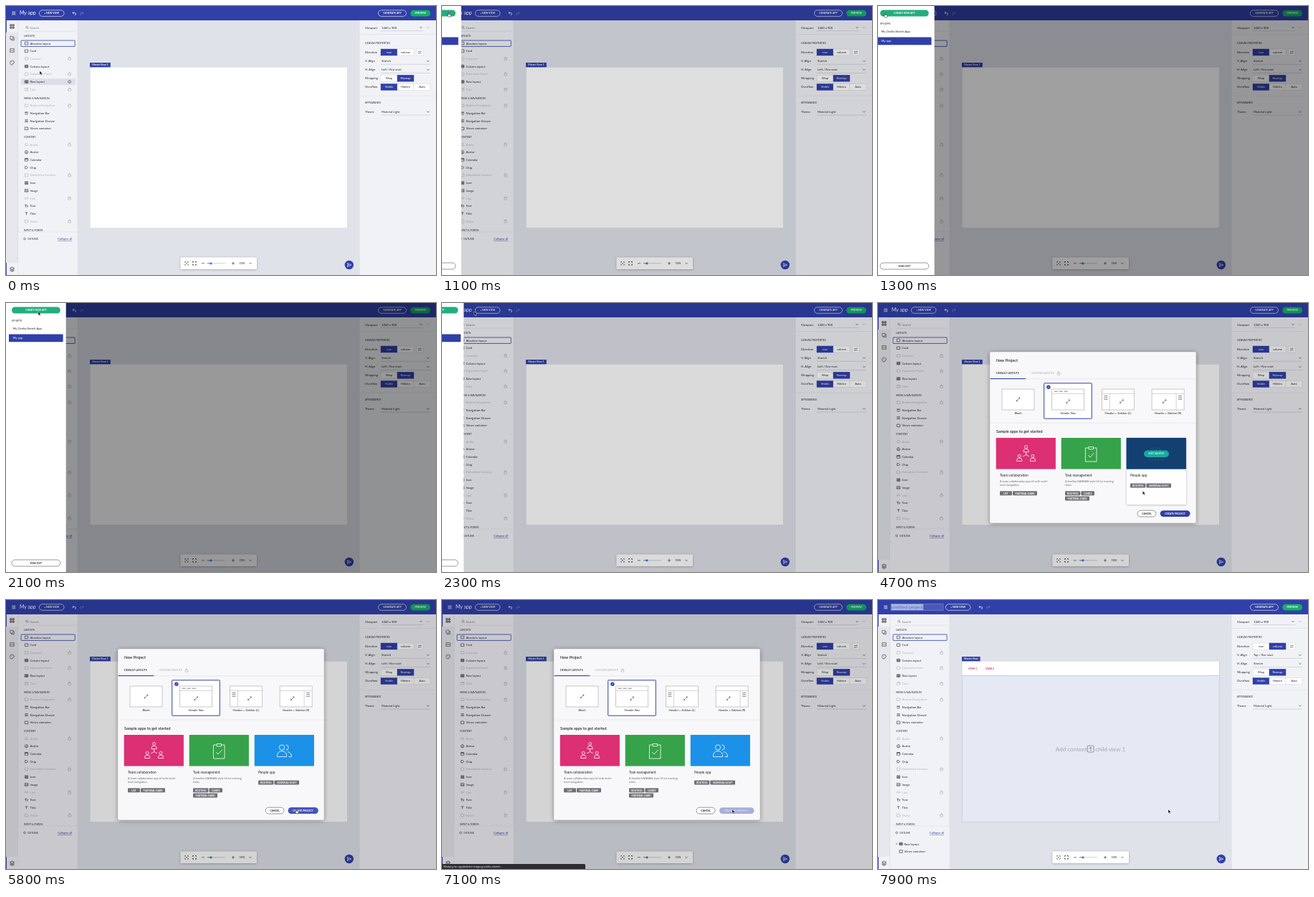
An HTML page that plays this animation: 600x375 px, repeating every 8000 ms.

```html
<!DOCTYPE html>
<html lang="en">
<head>
<meta charset="utf-8">
<title>App builder</title>
<style>
html, body { margin: 0; width: 100%; height: 100%; overflow: hidden; background: #e0e2ea; }
svg { display: block; width: 100vw; height: 100vh; font-family: Lato, "Open Sans", sans-serif; font-weight: 400; }
</style>
</head>
<body>
<svg id="stage" viewBox="0 0 600 375"></svg>
<script>
const LOOP = 8000, STEP = 100;
const INDIGO = '#3040a8', INK = '#25262c', GREY = '#b2b4bb', PANEL = '#f1f2f6', RULE = '#dcdee5';

// Drawing helpers
const attrs = o => Object.entries(o).map(([k, v]) => ` ${k}="${v}"`).join('');
const rect = (x, y, w, h, fill, o = {}) =>
  `<rect x="${x}" y="${y}" width="${w}" height="${h}" fill="${fill}"${attrs(o)}/>`;
const circle = (cx, cy, r, fill, o = {}) => `<circle cx="${cx}" cy="${cy}" r="${r}" fill="${fill}"${attrs(o)}/>`;
const line = (d, stroke = INK, w = 0.6, o = {}) =>
  `<path d="${d}" fill="none" stroke="${stroke}" stroke-width="${w}"${attrs(o)}/>`;
const text = (x, y, s, size = 4.2, fill = INK, o = {}) =>
  `<text x="${x}" y="${y}" font-size="${size}" fill="${fill}"${attrs(o)}>${s}</text>`;
const mid = (x, y, s, size, fill, o = {}) => text(x, y, s, size, fill, { 'text-anchor': 'middle', ...o });
const group = (id, body, o = {}) => `<g id="${id}"${attrs(o)}>${body}</g>`;
const at = (x, y, body) => `<g transform="translate(${x} ${y})">${body}</g>`;
const bold = { 'font-weight': 700 }, semi = { 'font-weight': 600 };

const pill = (x, y, w, h, label, fill, color, stroke = 'none') =>
  rect(x, y, w, h, fill, { rx: h / 2, stroke, 'stroke-width': 0.6 }) +
  mid(x + w / 2, y + h / 2 + 1.25, label, 3.5, color, bold);
const caret = (x, y) => line(`M${x - 1.6} ${y - 0.8}l1.6 1.6 1.6-1.6`, INK, 0.6);
const lock = (x, y) => at(x, y,
  rect(-1.8, -0.8, 3.6, 2.9, 'none', { rx: 0.4, stroke: '#9a9ca4', 'stroke-width': 0.5 }) +
  line('M-1-.8v-.6a1 1 0 0 1 2 0v.6', '#9a9ca4', 0.5));
const heading = (x, y, s) => text(x, y, s, 3.45, '#4a4b52', semi);

// Component palette; * marks a locked entry
const sections = [
  ['LAYOUTS', 52, 'Absolute layout,Card,*Carousel,Column layout,*Expansion Panel,Row layout,*Tabs'],
  ['MENU &amp; NAVIGATION', 138.7, '*Bottom Navigation,Navigation Bar,Navigation Drawer,Views container'],
  ['CONTENT', 193, '*Audio,Avatar,Calendar,Chip,*Embedded Content,Icon,Image,*Link,Text,Title,*Video']
];
const box = 'M-2.2-1.8h4.4v3.6h-4.4z';
const glyphs = {
  'Column layout': box + 'M-.8-1.8v3.6M.8-1.8v3.6M-2.2 0h4.4',
  'Row layout': box + 'M-2.2-.6h4.4M-2.2.6h4.4M0-1.8v3.6',
  Tabs: box + 'M0-1.8v1.2h2.2',
  'Navigation Bar': 'M-2.2-1.4h4.4M-2.2-.8h4.4M-2.2 1.4h4.4',
  'Navigation Drawer': 'M-2.2-1.5h4.4M-2.2 0h4.4M-2.2 1.5h4.4',
  Audio: 'M-1.6 1.6v-1.6a1.6 1.6 0 0 1 3.2 0v1.6z',
  Avatar: 'M-2.1 0a2.1 2.1 0 1 0 4.2 0a2.1 2.1 0 1 0-4.2 0M-1.2 1.4q1.2-1.4 2.4 0M-.5-.5h1',
  Calendar: box + 'M-2.2-1h4.4M-1-2.4v1M1-2.4v1',
  Chip: 'M-1.8-1.6h2l1.8 1.6-1.8 1.6h-2z',
  Icon: 'M-2-1.8h1.7v1.5h-1.7zM.4-1.8h1.7v1.5h-1.7zM-2 .4h1.7v1.5h-1.7zM.4 .4h1.7v1.5h-1.7z',
  Image: box + 'M-2 1.4l1.4-1.6 1 1 .8-.8 1 1.4',
  Link: 'M-.4 1h-.8a1 1 0 0 1 0-2h.8M.4-1h.8a1 1 0 0 1 0 2h-.8M-.8 0h1.6',
  Text: 'M-2.4-1.6h2.8M-1-1.6v3.4M.4-.3h2M1.4-.3v2.1',
  Title: 'M-1.8-1.6h3.6M0-1.6v3.4'
};
const items = [];
let palette = '';
for (const [title, top, names] of sections) {
  palette += heading(25, top - 8.6, title);
  names.split(',').forEach((raw, i) => {
    const locked = raw[0] === '*', name = raw.replace('*', ''), y = top + 10.72 * i;
    const color = locked ? GREY : INK;
    if (!locked) items.push(y);
    palette += at(28.5, y, line(glyphs[name] || box, color, 0.6)) + text(33.5, y + 1.5, name, 4.2, color);
    if (locked) palette += lock(88.6, y);
  });
}

const segment = (x, y, labels, on) => labels.map((s, i) =>
  rect(x + i * 23, y, 23, 9, i === on ? INDIGO : '#fff', { stroke: i === on ? INDIGO : '#c9cbd4', 'stroke-width': 0.4 }) +
  mid(x + i * 23 + 11.5, y + 5.9, s, 4, i === on ? '#fff' : INK)).join('');
const select = (y, value, right = 592) =>
  text(524, y + 1.5, value) + caret(right - 3, y) + line(`M523 ${y + 4.6}H${right}`, '#a9abb3', 0.4);

const expand = 'M-2.3-1v-1.3h1.3M1-2.3h1.3v1.3M2.3 1v1.3h-1.3M-1 2.3h-1.3v-1.3';
const plane = 'M-2.6-2.5l5.6 2.5-5.6 2.5.7-2.5zM-1.9 0h2.2';

const shell =
  rect(0, 0, 600, 375, '#e0e2ea') +
  rect(0, 20, 17, 355, '#e6e7ec') + rect(0, 20, 17, 17, PANEL) + rect(0, 358, 17, 17, PANEL) +
  rect(0, 20, 0.9, 17, INDIGO) + rect(0, 358, 0.9, 17, INDIGO) +
  rect(17, 20, 83, 355, PANEL) + line('M16.8 20V375M100 20V375', '#d3d5dd', 0.5) +
  rect(493, 20, 107, 355, PANEL) + line('M493 20V375', '#d3d5dd', 0.5) +
  line('M493 39.5H600M493 125.3H600', RULE, 0.6) +
  at(8.5, 28.5, line('M-2.7-2.7h2v2h-2zM.7-2.7h2v2h-2zM-2.7 .7h2v2h-2zM.7 .7h2v2h-2z', INK, 0.8)) +
  at(8.5, 45, line('M-2.7-2.7h4v4h-4zM-1 1.3v1.4h3.8v-4h-1.4', '#555', 0.7)) +
  at(8.5, 62, line('M-2.8-2.5h5.6v5h-5.6zM-2.8 0h5.6', '#555', 0.7)) +
  at(8.5, 79, line('M.5 3A3 3 0 1 1 3 0q0 1.2-1.5 1.2T.5 3zM-1.4-.6h.5M0-1.5h.5M1.3-.5h.4', '#555', 0.7)) +
  at(8.5, 367, line('M0-3l3 1.6-3 1.6-3-1.6zM-3 .3l3 1.6 3-1.6M-3 1.7l3 1.6 3-1.6', INK, 0.7)) +
  circle(29.2, 29.6, 1.4, 'none', { stroke: '#555', 'stroke-width': 0.5 }) + line('M30.3 30.7l1.3 1.3', '#555', 0.5) +
  text(33.5, 31.5, 'Search', 4.2, '#777') + line('M24 35.2H97', '#c6c8d0', 0.4) +
  group('hover', rect(21, -4.3, 76, 8.6, '#dcdee6') +
    circle(88.6, 0, 1.9, 'none', { stroke: INK, 'stroke-width': 0.5 }) + line('M88.6-.3v1.3M88.6-1v.3', INK, 0.5)) +
  rect(21, 48, 75.2, 8.4, PANEL, { stroke: INDIGO, 'stroke-width': 0.8, rx: 0.5 }) + palette +
  heading(25, 313.6, 'INPUT &amp; FORMS') + rect(17.2, 315, 82.6, 60, PANEL) + line('M17 315H100', RULE, 0.6) +
  circle(26, 324.5, 1.4, 'none', { stroke: INK, 'stroke-width': 0.5 }) +
  heading(30, 325.8, 'OUTLINE') +
  text(72, 326, 'Collapse all', 4.1, INDIGO, { 'text-decoration': 'underline' }) +
  rect(0, 0, 600, 20, INDIGO) +
  line('M8.3 8.2h5M8.3 10h5M8.3 11.8h5', '#fff', 0.7) +
  pill(519.5, 5.8, 39, 8.6, 'GENERATE APP', 'none', '#fff', '#fff') +
  pill(564.3, 5.8, 27.8, 8.6, 'PREVIEW', '#12b066', '#fff') +
  text(501, 31.5, 'Viewport') + select(30, '1440 x 900', 582) + line('M586.5 30h4', '#999', 0.5) +
  heading(501, 53.2, 'CANVAS PROPERTIES') +
  ['Direction', 'V. Align', 'H. Align', 'Wrapping', 'Overflow'].map((s, i) =>
    text(501, [66, 78.2, 90.4, 102, 114.3][i], s)).join('') +
  rect(572.3, 60, 10, 9, '#fff', { stroke: '#c9cbd4', 'stroke-width': 0.4 }) +
  line('M575 63.5h4.4l-1-1M579.6 65.7h-4.4l1 1', INK, 0.5) +
  segment(523, 96.2, ['Wrap', 'Nowrap'], 1) + segment(523, 108.5, ['Visible', 'Hidden', 'Auto'], 0) +
  heading(501, 136.2, 'APPEARANCE') + text(501, 149, 'Theme') + select(147.5, 'Material Light');

const tools =
  rect(243.5, 350.5, 106.5, 16.5, '#fff', { rx: 1.5, filter: 'url(#soft)' }) +
  at(252, 358.8, line(expand, INK, 0.6) + circle(0, 0, 0.7, INK)) + at(263, 358.8, line(expand, INK, 0.9)) +
  line('M273 358.8h4M315 358.8h4M317 356.8v4', INK, 0.6) +
  line('M281 358.8H306', '#b5bad6', 0.7) + line('M281 358.8H286', '#3f7fd0', 0.8) + circle(286, 358.8, 1.6, '#3f7fd0') +
  text(325.2, 360.3, '74%') + caret(341, 358.8) +
  circle(478.8, 361, 6.2, INDIGO) + at(478.8, 361, line(plane, '#fff', 0.6));

// Parts that differ between the two projects
const headTools = x =>
  pill(x, 5.8, 34.6, 8.6, '+ NEW VIEW', 'none', '#fff', '#fff') +
  at(x + 48.8, 10.2, line('M-.6-2.2L-2.3-.6-.6 1M-2.3-.6H.8a1.5 1.5 0 0 1 0 3', '#fff', 0.7)) +
  at(x + 59.5, 10.2, line('M.6-2.2L2.3-.6 .6 1M2.3-.6H-.8a1.5 1.5 0 0 0 0 3', '#7480c8', 0.7));
const viewTab = (w, s) => rect(117, 79, w, 6.3, INDIGO) + mid(117 + w / 2, 83.3, s, 3.5, '#fff', bold);
const settings = (dir, v, h) => segment(523, 60, ['row', 'column'], dir) + select(76.7, v) + select(88.9, h);

const oldView =
  text(19, 12.4, 'My app', 6.9, '#fff') + headTools(46.4) +
  rect(117.2, 85.2, 359, 224.3, '#fff', { stroke: '#d0d3dc', 'stroke-width': 0.4 }) +
  viewTab(28.8, 'Master View 1') + settings(0, 'Stretch', 'Left / flex-start');
const newView =
  rect(18, 5.2, 73, 9.6, '#4a59b8', { stroke: '#8e99d4', 'stroke-width': 0.5 }) +
  rect(18.6, 5.8, 44.6, 8.2, '#a9b8e3') + text(19, 12.4, 'untitled-project', 6.4, '#5c69b4') + headTools(94.4) +
  rect(117.2, 85.2, 359, 224.3, '#e4e9f4', { stroke: '#b9c2d8', 'stroke-width': 0.6 }) +
  rect(117.5, 85.5, 358.4, 20, '#fff') + line('M117.2 105.5H476.2', '#9fb0d0', 0.6) +
  text(126, 97, 'VIEW 1', 3.5, '#e0245e', bold) + text(150, 97, 'VIEW 2', 3.5, '#e0245e', bold) +
  viewTab(25.6, 'Master View') +
  mid(296.5, 210.6, 'Add content to child view 1', 8.1, '#a2a7b2') +
  rect(292.3, 203.2, 8.8, 8.8, '#e4e9f4', { rx: 1, stroke: '#6d7180', 'stroke-width': 0.7 }) +
  line('M296.7 210v-4.6M294.8 207.2l1.9-1.9 1.9 1.9', '#6d7180', 0.7) +
  settings(1, 'Top / flex-start', 'Stretch') +
  line('M25.2 338.7l1.2 1.2-1.2 1.2') + at(32, 340, line(glyphs['Row layout'])) + text(36.5, 341.5, 'Row layout') +
  at(32, 350.5, line(box)) + text(36.5, 352, 'Views container');

// New project dialog
const CARD_X = 162, CARD_GAP = 69.7;
const thumbs = ['Blank', 'Header Nav', 'Header + Sidebar (L)', 'Header + Sidebar (R)'].map((name, i) => {
  const x = 173 + i * CARD_GAP, c = '#a3a5ad';
  const side = i === 2 ? 11 : 34, barX = i === 2 ? 3 : 37;
  let s = rect(x, 120, 45, 29, '#fff', { stroke: c, 'stroke-width': 0.6 });
  if (i) s += line(`M${x} 126.3h45`, c, 0.5);
  if (i === 1) s += line(`M${x + 3} 123.2h5m2 0h5m2 0h5`, '#777', 0.9);
  if (i > 1) s += line(`M${x + side} 126.3V149`, c, 0.5) +
    line([129.3, 131.8, 134.3].map(y => `M${x + barX} ${y}h5`).join(''), '#777', 0.9);
  const ax = x + 22.5 + [0, 0, 5, -5][i], ay = i ? 137.2 : 134.5;
  return s + line(`M${ax - 2.3} ${ay + 2.3}l4.6-4.6M${ax + 0.5} ${ay - 2.3}h1.8v1.8M${ax - 2.3} ${ay + 0.5}v1.8h1.8`, '#444', 0.6) +
    mid(x + 22.5, 154.6, name, 4.15, INK);
}).join('');

const person = (x, y, k) => `M${x - k} ${y}a${k} ${k} 0 1 0 ${2 * k} 0a${k} ${k} 0 1 0 ${-2 * k} 0` +
  `M${x - 1.8 * k} ${y + 3.6 * k}v-${0.6 * k}a${1.8 * k} ${1.6 * k} 0 0 1 ${3.6 * k} 0v${0.6 * k}z`;
const art = [
  person(206.6, 200.5, 2) + person(197.2, 213.3, 2) + person(216, 213.3, 2) + 'M206.6 208v3.4M206.6 211.4l-4.4 2.6M206.6 211.4l4.4 2.6',
  'M294 202h-4.6v19h15.6v-19H300.5M294 200.5h6.5v3.4h-6.5zM293 212l3 3 5.4-6',
  person(385, 205.5, 3.6) + 'M390.5 202a3.6 3.6 0 0 1 0 7.2M393 211.5q5.5 1.5 5.5 7h-4'
];
const chip = (x, y, w, s) => rect(x, y, w, 6, '#707178', { rx: 0.9 }) + mid(x + w / 2, y + 4.3, s, 3.4, '#fff', bold);
const sample = (i, color, title, lines) => {
  const x = 164.7 + 91 * i;
  return rect(x, 188, 83.2, 43.5, color) + line(art[i], '#fff', 0.8) + text(x + 5.3, 241.7, title, 4.8) +
    lines.map((s, j) => text(x + 5.3, 249.6 + 5.4 * j, s, 3.9, '#6b6c74')).join('');
};

const dialog =
  rect(156.2, 68.3, 287.4, 238.3, '#f8f8fa', { rx: 2, filter: 'url(#deep)' }) +
  text(165, 82, 'New Project', 5.5, INK, semi) +
  text(165, 99.3, 'DEFAULT LAYOUTS', 3.55, INK, semi) +
  text(214, 99.3, 'CUSTOM LAYOUTS', 3.55, GREY, semi) + lock(252, 98.2) +
  line('M156.5 105.8H443.5M156.5 167.2H443.5', RULE, 0.6) + rect(156.5, 105, 49.7, 1.1, INDIGO) +
  rect(0, 111.5, 67, 49.8, '#e3e4e9', { id: 'cardHover' }) +
  group('picked', rect(0, 111.8, 66.6, 49.4, '#fff', { stroke: INDIGO, 'stroke-width': 1, rx: 0.6 })) +
  thumbs +
  group('tick', circle(6.2, 117.3, 2.7, INDIGO) + line('M5.1 118.4l2.2-2.2', '#fff', 0.8)) +
  text(165, 181, 'Sample apps to get started', 5.5, INK, semi) +
  rect(347, 188, 83, 93, '#fff', { id: 'lift', filter: 'url(#soft)' }) +
  sample(0, '#dc2f74', 'Team collaboration', ['A team collaboration app UI with multi-', 'level navigation']) +
  sample(1, '#36a24a', 'Task management', ['A familiar KANBAN style UI for tracking', 'tasks.']) +
  sample(2, '#1c91e8', 'People app', []) +
  chip(170, 262.2, 17, 'LIST') + chip(188, 262.2, 34, 'MATERIAL-DARK') +
  chip(261, 262.2, 21.3, 'ROUTING') + chip(283.4, 262.2, 18.6, 'CARDS') + chip(261, 269.4, 34, 'MATERIAL-DARK') +
  chip(352, 251.4, 21.3, 'ROUTING') + chip(374.4, 251.4, 34.6, 'MATERIAL-LIGHT') +
  group('edit', rect(346.7, 188, 83.2, 43.5, '#14305c', { opacity: 0.88 }) +
    pill(371, 205.5, 35, 9.4, 'EDIT SAMPLE', '#14ae9c', '#dff5f0')) +
  group('ready', pill(362, 289.2, 26, 8.8, 'CANCEL', '#fff', INK, '#55565e') + pill(393.7, 289.2, 41.8, 8.8, 'CREATE PROJECT', INDIGO, '#fff') +
    group('glow', pill(393.7, 289.2, 41.8, 8.8, 'CREATE PROJECT', '#4454bb', '#fff'))) +
  group('busy', pill(355, 289.2, 26, 8.8, 'CANCEL', '#fff', INK, '#55565e') +
    pill(387, 289.2, 48.5, 8.8, 'CREATING PROJECT...', '#a6aedb', '#d8dcf1'));

const drawer =
  rect(-20, 0, 103.7, 375, '#fff') + pill(8, 5.5, 67.8, 9, 'CREATE NEW APP', '#22ae7c', '#fff') +
  heading(8, 26, 'MY APPS') + text(9.5, 37, 'My Ovelia.Sketch App') +
  rect(4, 43.6, 75.6, 10.6, INDIGO, { rx: 0.8 }) + text(9.5, 50.4, 'My app', 4.2, '#fff') +
  pill(8, 358, 67.8, 9, 'SIGN OUT', '#fff', INK, '#55565e');

const shadow = (id, d, o) =>
  `<filter id="${id}" x="-20%" y="-20%" width="140%" height="150%"><feDropShadow dx="0" dy="${d / 3}" stdDeviation="${d}" flood-opacity="${o}"/></filter>`;

const stage = document.getElementById('stage');
stage.innerHTML = `<defs>${shadow('soft', 1.5, 0.3)}${shadow('deep', 3, 0.4)}</defs>` +
  shell + group('oldView', oldView) + group('newView', newView) + tools +
  rect(0, 0, 600, 375, '#000', { id: 'dim' }) + group('dialog', dialog) + group('drawer', drawer) +
  group('status', rect(-2, 368, 202, 10, '#2b2d33', { rx: 1.5 }) +
    text(2, 373.2, 'Waiting for appbuilder-staging.ovelia.sketch...', 4.1, '#e8e8ea', { 'font-family': 'Roboto, sans-serif' })) +
  group('arrow', '<path d="M0 0v5.2l1.2-1.1.9 2 .9-.4-.9-1.9h1.6z" fill="#000" stroke="#fff" stroke-width=".4"/>') +
  group('hand', '<path d="M-.6 0q.6-.7 1.1 0v2l2.4.6q.6.3.4 1.2l-.5 2h-2.9l-1.7-2.4q.1-.8.9-.3l.3.3z" fill="#fff" stroke="#000" stroke-width=".5"/>');

const el = {};
stage.querySelectorAll('[id]').forEach(n => el[n.id] = n);

// Motion
const clamp = v => Math.max(0, Math.min(1, v));
const ramp = (t, a, b) => clamp((t - a) / (b - a));
const smooth = p => p * p * (3 - 2 * p);
const easeOut = p => 1 - (1 - p) ** 3;
const fade = (id, v) => {
  el[id].setAttribute('opacity', v);
  el[id].setAttribute('visibility', v > 0 ? 'visible' : 'hidden');
};
const move = (id, x, y = 0) => el[id].setAttribute('transform', `translate(${x} ${y})`);

// Pointer stops: each leg runs from time a to time b and ends at x, y
const legs = [
  [-350, 750, 9, 9], [1000, 1300, 9.8, 10.2], [1500, 2050, 45, 12],
  [2350, 2900, 156, 140], [3000, 3300, 303, 149.5], [3400, 3900, 272, 141],
  [4400, 4750, 375, 269], [4750, 5400, 405, 292]
];
function pointer(t) {
  let x = 59, y = 116;
  for (const [a, b, toX, toY] of legs) {
    const p = smooth(ramp(t, a, b));
    x += (toX - x) * p;
    y += (toY - y) * p;
  }
  return [x, y];
}

function draw(t) {
  const [x, y] = pointer(t);
  const opened = easeOut(ramp(t, 1050, 1460)), closed = easeOut(ramp(t, 2200, 2550));
  const shown = easeOut(ramp(t, 2300, 2700)) * (1 - smooth(ramp(t, 7150, 7550)));

  const lag = pointer(t - 100);
  const row = t < 800 ? items.find(v => Math.abs(v - lag[1]) < 5.3 && lag[0] > 21) : undefined;
  fade('hover', row ? 1 : 0);
  if (row) move('hover', 0, row);

  const loaded = t >= 7300;
  fade('oldView', loaded ? 0 : 1);
  fade('newView', loaded ? 1 : 0);
  fade('status', t >= 7100 && t < 7600 ? 1 : 0);

  move('drawer', -84 * (1 - opened + closed));
  fade('drawer', opened > 0 && closed < 1 ? 1 : 0);
  fade('dim', Math.max(0.4 * opened * (1 - closed), 0.17 * shown));
  fade('dialog', shown);

  if (shown > 0) {
    const pick = t < 4100 ? 0 : 1, pickX = CARD_X + pick * CARD_GAP;
    move('picked', pickX);
    move('tick', pickX);
    const over = Math.floor((x - CARD_X) / CARD_GAP);
    const onCard = y > 111.5 && y < 161 && over >= 0 && over < 4 && over !== pick;
    fade('cardHover', onCard ? 1 : 0);
    if (onCard) move('cardHover', CARD_X + over * CARD_GAP);
    const lift = smooth(ramp(t, 4560, 4720)) * (1 - smooth(ramp(t, 5100, 5300)));
    fade('lift', lift);
    fade('edit', lift);
    fade('ready', t < 6100 ? 1 : 0);
    fade('glow', t < 6100 ? ramp(t, 5300, 5600) : 0);
    fade('busy', t < 6100 ? 0 : 1);
  } else {
    ['cardHover', 'lift', 'edit', 'ready', 'glow', 'busy'].forEach(id => fade(id, 0));
  }

  const pointing = (t >= 700 && t < 1800) || (t > 3050 && t < 4480) || (t > 5300 && t < 6100);
  fade('arrow', pointing ? 0 : 1);
  fade('hand', pointing ? 1 : 0);
  move('arrow', x, y);
  move('hand', x, y);
}

const start = performance.now();
function tick() {
  const t = (performance.now() - start) % LOOP;
  draw(Math.floor(t / STEP) * STEP);
  requestAnimationFrame(tick);
}
tick();
</script>
</body>
</html>
```
